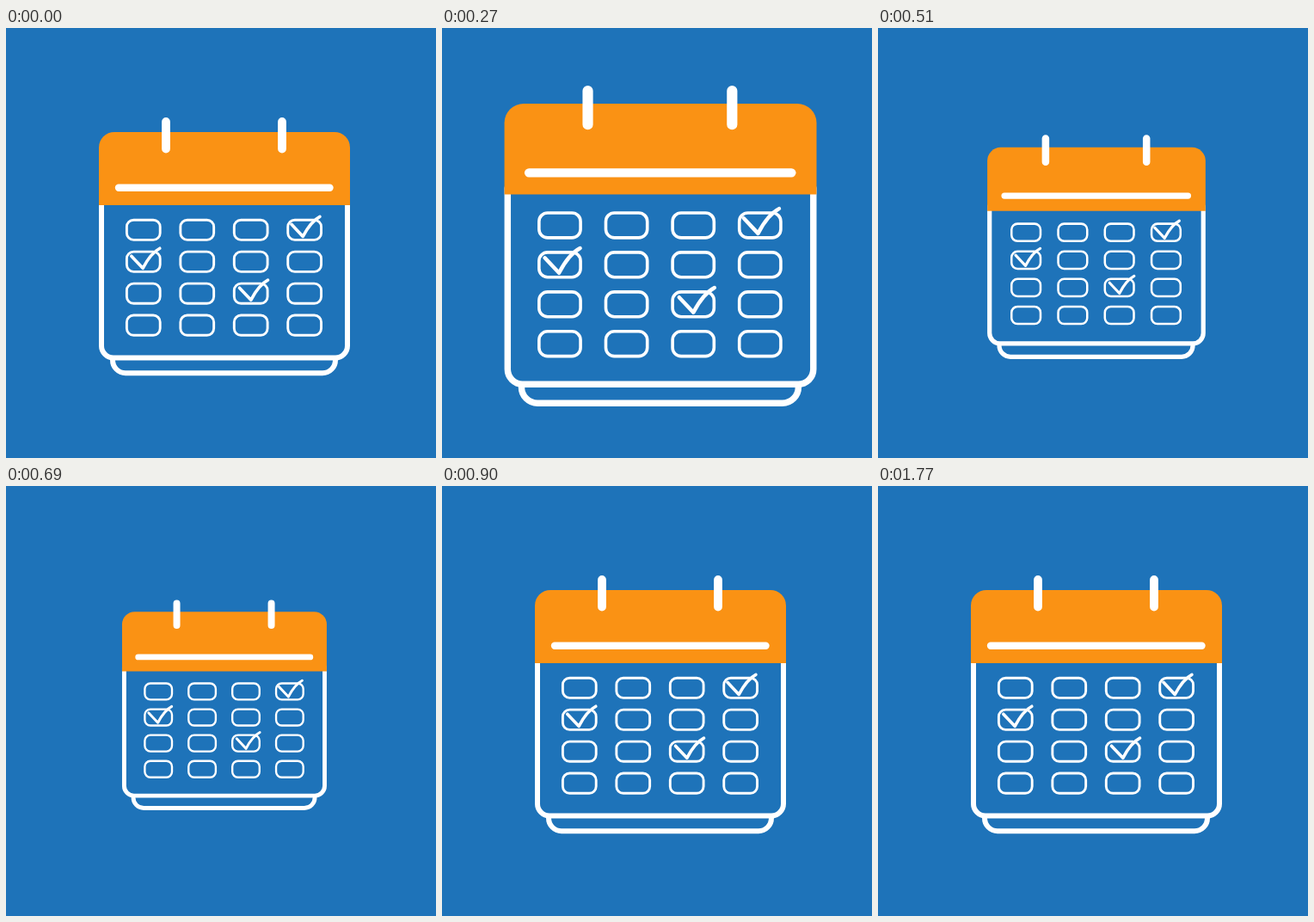
Animation of 500 by 500 pixels, one loop 1800 ms. Source, as an HTML page:

```html
<!DOCTYPE html>
<html lang="en">
<head>
<meta charset="utf-8">
<title>Calendar pulse</title>
<style>
  html, body { margin: 0; height: 100%; overflow: hidden; background: #1e73b9; }
  svg { display: block; width: 100%; height: 100%; }
</style>
</head>
<body>
<svg viewBox="0 0 500 500">
  <defs>
    <rect id="cell" x="-19.4" y="-11.6" width="38.8" height="23.2" rx="8" stroke-width="2.9"/>
    <path id="check" d="M-14-6.5L-.7 7.6Q8.5-10 19-15.5" stroke-width="3.6"/>
  </defs>
  <g id="calendar" fill="none" stroke="#fff" stroke-linecap="round" stroke-linejoin="round">
    <path d="M124 386a15 15 0 0 0 15 15.2H368a15 15 0 0 0 15-15.2" stroke-width="6"/>
    <path d="M111 200V369.5a14 14 0 0 0 14 14H383a14 14 0 0 0 14-14V200" fill="#1e73b9" stroke-width="6"/>
    <path d="M108 206V139a18 18 0 0 1 18-18H382a18 18 0 0 1 18 18V206Z" fill="#fa9214" stroke="none"/>
    <path d="M131 185.7H376.5" stroke-width="8.4"/>
    <path d="M186 109V140.5M321 109V140.5" stroke-width="9.8"/>
    <g id="grid"></g>
  </g>
</svg>
<script>
const LOOP = 1800, STEP = 30, SEGMENT = 300;
const SCALES = [1, 1.25, 0.764, 1];
const CENTER = [253.8, 257];
const calendar = document.getElementById('calendar');

const place = (id, col, row, dx = 0) =>
  `<use href="#${id}" x="${159.8 + 62.45 * col + dx}" y="${234.8 + 36.95 * row}"/>`;

let grid = '';
for (let i = 0; i < 16; i++) grid += place('cell', i % 4, i >> 2);
grid += place('check', 3, 0, -1.2) + place('check', 0, 1) + place('check', 2, 2, 0.8);
document.getElementById('grid').innerHTML = grid;

const smooth = p => p * p * (3 - 2 * p);

function scaleAt(t) {
  const i = Math.floor(t / SEGMENT);
  if (i >= SCALES.length - 1) return 1;
  return SCALES[i] + (SCALES[i + 1] - SCALES[i]) * smooth(t / SEGMENT - i);
}

function draw() {
  const t = Math.floor(performance.now() % LOOP / STEP) * STEP;
  const [x, y] = CENTER;
  calendar.setAttribute('transform',
    `translate(${x} ${y}) scale(${scaleAt(t)}) translate(${-x} ${-y})`);
  requestAnimationFrame(draw);
}
draw();
</script>
</body>
</html>
```
